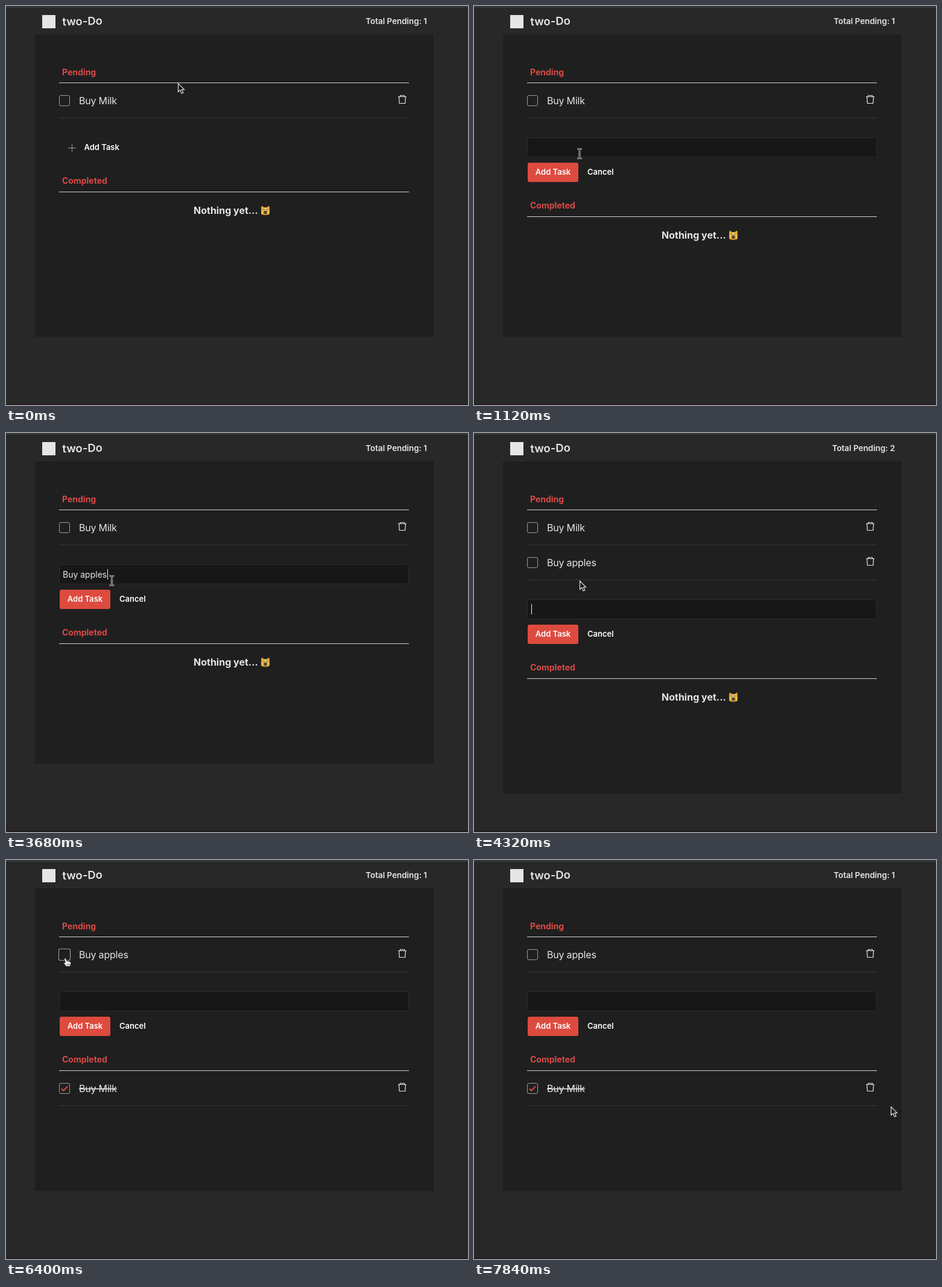
Animation, 766 px wide and 662 px high, one loop 8000 ms. Source, as an HTML page:

```html
<!DOCTYPE html>
<html lang="en">
<head>
<meta charset="utf-8">
<title>To-do list</title>
<style>
html, body { margin: 0; width: 100%; height: 100%; overflow: hidden; background: #282828; }
svg { display: block; width: 100%; height: 100%; }
text { font-family: Inter, "Open Sans", sans-serif; fill: #e6e6e6; white-space: pre; }
.heading { font-size: 14px; font-weight: 700; fill: #d94a47; }
.task { font-size: 16px; letter-spacing: -.2px; }
.done { text-decoration: line-through; }
.button { font-size: 13px; font-weight: 600; fill: #fff; }
.icon { fill: none; stroke: #e8e8e8; stroke-width: 1.2; }
</style>
</head>
<body>
<svg id="stage" viewBox="0 0 766 662"></svg>
<script>
const LOOP = 8000, STEP = 160;
const stage = document.getElementById('stage');

const rect = (x, y, w, h, fill, extra = '') =>
  `<rect x="${x}" y="${y}" width="${w}" height="${h}" fill="${fill}" ${extra}/>`;
const text = (x, y, cls, content, extra = '') =>
  `<text x="${x}" y="${y}" class="${cls}" ${extra}>${content}</text>`;
const at = (x, y, content) => `<g transform="translate(${x} ${y})">${content}</g>`;

// [time, text in the input]
const typing = [[0, ''], [2080, 'B'], [2240, 'Bu'], [2400, 'Buy'], [2880, 'Buy '], [3040, 'Buy a'],
  [3200, 'Buy ap'], [3360, 'Buy app'], [3520, 'Buy appl'], [3680, 'Buy apples'], [4160, '']];
const caretSpans = [[1280, 1760], [2080, 4640], [5280, 5760]];

// [time, x, y, shape]; positions are interpolated, shapes switch
const pointer = [
  [0, 285, 128, 'arrow'], [160, 281, 136, 'arrow'], [480, 232, 198, 'arrow'], [800, 177, 242, 'hand'],
  [960, 175, 245, 'beam'], [2720, 175, 245, 'beam'], [2880, 176, 245, 'beam'],
  [4160, 175, 245, 'beam'], [4320, 175, 245, 'arrow'], [5120, 175, 245, 'arrow'],
  [5280, 171, 234, 'arrow'], [5600, 137, 157, 'beam'], [5920, 98, 163, 'hand'],
  [6400, 98, 163, 'hand'], [6560, 122, 172, 'arrow'], [6880, 330, 248, 'arrow'],
  [7360, 668, 372, 'arrow'], [7520, 712, 400, 'arrow'], [7680, 732, 418, 'arrow'],
  [7840, 691, 409, 'arrow']
];

const shapes = {
  arrow: `<path d="M.5 .5V14.5L3.8 11.6 6.2 17 8.8 15.9 6.5 10.7H10.5Z"
    fill="#1c1c1c" stroke="#dedede" stroke-width="1.2"/>`,
  beam: `<path d="M-4-8Q0-8 0-5Q0-8 4-8M0-6V6M-4 8Q0 8 0 5Q0 8 4 8M-2 1H2"
    fill="none" stroke="#c4c4c4" stroke-width="2.6"/>
    <path d="M-4-8Q0-8 0-5Q0-8 4-8M0-6V6M-4 8Q0 8 0 5Q0 8 4 8M-2 1H2"
    fill="none" stroke="#333" stroke-width="1"/>`,
  hand: `<path d="M-1.5 .8Q0-1 1.5 1L3 5Q4 4 5 5Q6.5 4.3 7 5.7Q9.5 5 9.5 8L8.5 13.5H2L-2.5 8Q-2 6 .5 8Z"
    fill="#f4f4f4" stroke="#222" stroke-width=".8"/>
    <path d="M3.6 9V12M5.5 9V12M7.3 9V12" stroke="#444" stroke-width=".7"/>`
};

const trash = `<path class="icon" d="M650 150.5H664M653.5 150.5V148.5H660.5V150.5M651.5 150.5L652.3 161.5H661.7L662.5 150.5"/>`;

const cat = `<path d="M423 334L424 331.5 428 334H432L436 331.5 437 334V343Q436 347 430 347Q424 347 423 343Z" fill="#e0a02e"/>
  <path d="M426 335.5H434V339H426Z" fill="#f2dc8c"/>
  <circle cx="427.7" cy="337.5" r="1" fill="#403a30"/><circle cx="432.3" cy="337.5" r="1" fill="#403a30"/>
  <ellipse cx="430" cy="342.5" rx="2.5" ry="3" fill="#4d493f"/>
  <path d="M424.8 339V346M435.2 339V346" stroke="#f4c04c" stroke-width="2.4"/>`;

// Rows are drawn as if first under the "Pending" rule, then shifted by dy.
function taskRow(label, dy, { done = false, hover = false } = {}) {
  const scale = hover ? 'transform="translate(97 157) scale(1.12) translate(-97 -157)"' : '';
  return at(0, dy,
    rect(88.5, 148.5, 17, 17, 'none', `rx="2.5" stroke="#9b9b9b" ${scale}`) +
    (done ? '<path d="M92 157.2L95.3 160.8 102 153.6" fill="none" stroke="#df4c42" stroke-width="2"/>' : '') +
    text(121, 163, done ? 'task done' : 'task', label) + trash +
    rect(88, 185, 580, 1, '#363636'));
}

function section(title, y) {
  return text(93, y, 'heading', title);
}

function addForm(dy, value) {
  return at(0, dy,
    rect(88.5, 218.5, 579, 32, '#171717', 'rx="3" stroke="#2b2b2b"') +
    text(94, 240, '', value, 'id="value" font-size="14"') +
    rect(95, 226, 1, 17, '#f4f4f4', 'id="caret"') +
    rect(89, 260, 84, 32, '#dd4b3f', 'rx="3"') +
    text(131, 280, 'button', 'Add Task', 'text-anchor="middle"') +
    text(188, 280, 'button', 'Cancel'));
}

const addLink = '<path d="M103 235.5H116M109.5 229V242" stroke="#999"/>' +
  text(129.5, 239, 'button', 'Add Task');

function pointerAt(t) {
  const i = pointer.findLastIndex(key => key[0] <= t);
  const [t0, x0, y0, shape] = pointer[i];
  const [t1, x1, y1] = pointer[i + 1] || [LOOP, x0, y0];
  const k = (t - t0) / (t1 - t0);
  return at(x0 + (x1 - x0) * k, y0 + (y1 - y0) * k, shapes[shape]);
}

function draw(t) {
  const open = t >= 960, done = t >= 6400, two = t >= 4160 && !done;
  const hover = t >= 5920 && t < 6560;
  const extra = two ? 58 : 0;
  const lower = extra + (open ? 41 : 0);
  const value = typing.findLast(key => key[0] <= t)[1];

  stage.innerHTML =
    rect(0, 0, 766, 662, '#282828') + rect(0, 0, 766, 3, '#34383c') + rect(0, 660, 766, 2, '#221b20') +
    rect(60, 15, 22, 22, '#e6e6e6') +
    text(93.5, 32.5, '', 'two-Do', 'font-size="18.5" font-weight="600" transform="rotate(-1.5 94 32)"') +
    text(698, 30, '', `Total Pending: ${two ? 2 : 1}`, 'font-size="13.4" font-weight="600" text-anchor="end"') +
    rect(48, 47, 661, two ? 551 : 502, '#1f1f1f') +
    section('Pending', 115) + rect(88, 127, 580, 1, '#d2d2d2') +
    taskRow(done ? 'Buy apples' : 'Buy Milk', 0, { hover }) +
    (two ? taskRow('Buy apples', 58) : '') +
    (open ? addForm(extra, value) : addLink) +
    at(0, lower, section('Completed', 295) + rect(88, 308, 580, 1, '#d2d2d2') +
      (done ? taskRow('Buy Milk', 181, { done: true })
        : text(311, 345, '', 'Nothing yet...', 'font-size="16" font-weight="700"') + cat)) +
    pointerAt(t);

  if (open) {
    const caret = document.getElementById('caret');
    const width = value ? document.getElementById('value').getComputedTextLength() : 0;
    caret.setAttribute('x', Math.round(94.6 + width));
    caret.setAttribute('visibility', caretSpans.some(([a, b]) => t >= a && t < b) ? 'visible' : 'hidden');
  }
}

let start, shown = -1;
function tick(now) {
  start ??= now;
  const time = Math.floor((now - start) % LOOP / STEP) * STEP;
  if (time !== shown) draw(shown = time);
  requestAnimationFrame(tick);
}
draw(0);
requestAnimationFrame(tick);
</script>
</body>
</html>
```
